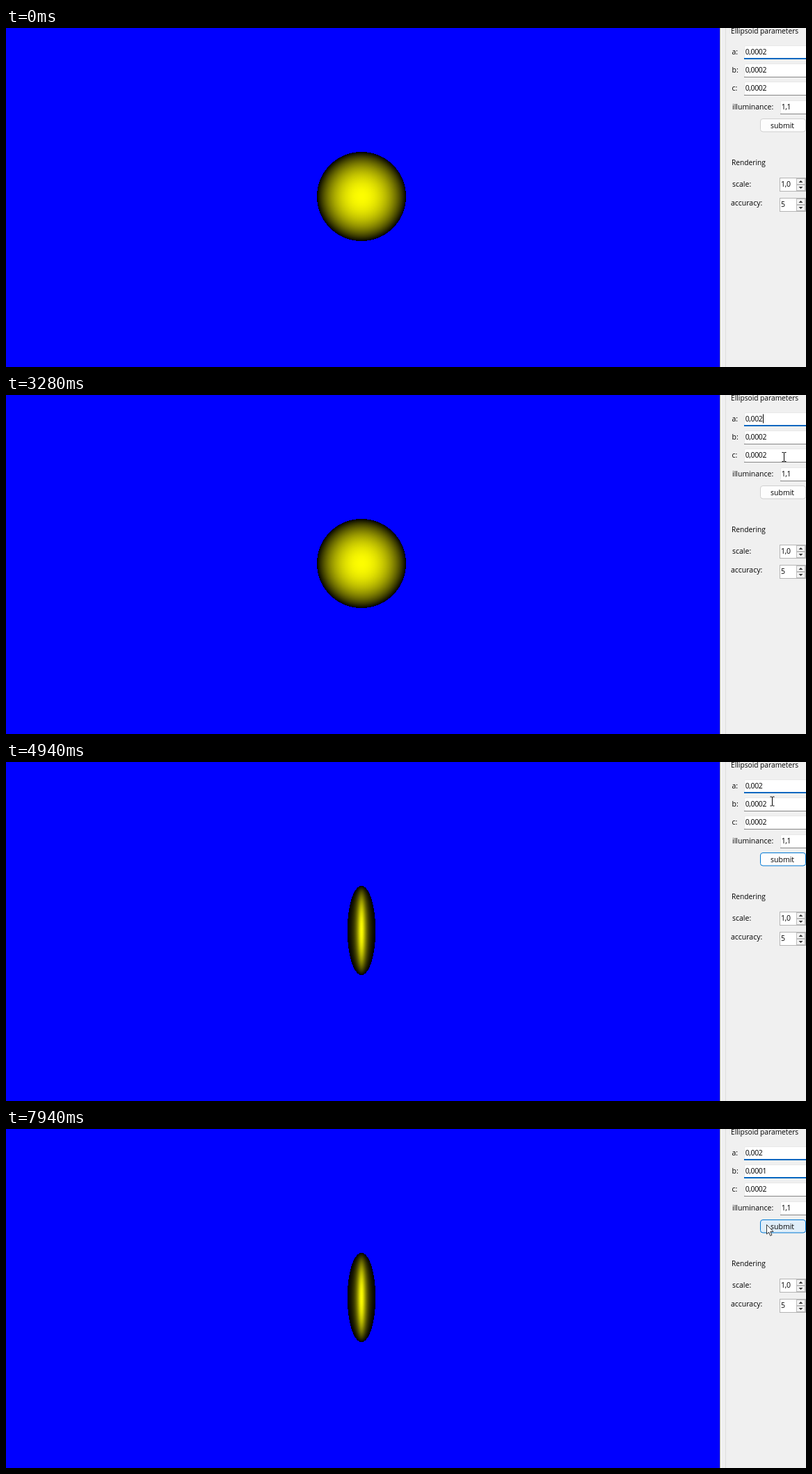
These frames come from a looping animation (1150x487 px, 8000 ms). An HTML page with a canvas:

```html
<!DOCTYPE html>
<html lang="en">
<head>
<meta charset="utf-8">
<title>Ellipsoid viewer</title>
<style>
  html, body { margin: 0; width: 100%; height: 100%; overflow: hidden; background: #f0f0f0; }
  svg, canvas { position: absolute; display: block; }
  svg { left: 0; top: 0; }
  #solid { left: 444px; top: 175px; }
  text { font: 10.5px "Open Sans", "Noto Sans", sans-serif; fill: #000; white-space: pre; }
  .head { font-size: 10.2px; }
  .num { letter-spacing: -.35px; }
  .box { fill: #fff; stroke: #e8e8e8; }
  .spin { fill: #f3f3f3; stroke: #bdbdbd; }
  .frame { fill: #fff; stroke: #b4b4b4; }
</style>
</head>
<body>
<svg width="1150" height="487" viewBox="0 0 1150 487">
  <rect width="1150" height="487" fill="#f0f0f0"/>
  <rect width="1026" height="487" fill="#00f"/>
  <rect x="1026" width="1" height="487" fill="#a0a0a0"/>
  <rect x="1027" width="1" height="487" fill="#fff"/>
  <rect x="1034" width="1" height="487" fill="#dedede"/>
  <g id="panel"></g>
  <rect id="face" x="1084.5" y="130.5" width="65" height="18.5" rx="3.5"/>
  <text x="1099" y="144">submit</text>
  <rect id="caret" width="1" height="13"/>
  <path id="beam" d="M-3 -6.5H-1L0 -6L1 -6.5H3M0 -6V6M-3 6.5H-1L0 6L1 6.5H3" fill="none" stroke="#000"/>
  <path id="arrow" d="M.5 .5V14L3.6 11.2L5.7 16.3L7.9 15.4L5.8 10.4H10Z" fill="#fff" stroke="#222" stroke-width=".9"/>
</svg>
<canvas id="solid" width="136" height="136"></canvas>
<script>
const $ = id => document.getElementById(id);
const LOOP = 8000, STEP = 70, TEXT_X = 1062.7;

function add(tag, attrs, text) {
  const el = document.createElementNS('http://www.w3.org/2000/svg', tag);
  for (const k in attrs) el.setAttribute(k, attrs[k]);
  if (text) el.textContent = text;
  return $('panel').appendChild(el);
}
const label = (x, y, text, cls = '') => add('text', { x, y, class: cls }, text);

function field(x, bottom, value) {
  add('rect', { x: x + .5, y: bottom - 19.5, width: 100, height: 19, rx: 2, class: 'box' });
  const line = add('rect', { x, y: bottom - 1, width: 100, height: 1, fill: '#868686' });
  const text = label(x + 1.7, bottom - 7, value, 'num');
  return { x, bottom, line, text, value };
}

function spinner(y, value) {
  add('rect', { x: 1112.5, y: y + .5, width: 37, height: 19, class: 'frame' });
  label(1114, y + 13, value, 'num');
  for (const s of [-1, 1]) {
    const cy = y + 10 + s * 4.5;
    add('rect', { x: 1136.5, y: cy - 4, width: 12, height: 8, class: 'spin' });
    add('path', { d: `M1139.5 ${cy - s * 1.5}h6l-3 ${s * 3}z`, fill: '#333' });
  }
}

label(1042, 8, 'Ellipsoid parameters', 'head');
label(1043, 197, 'Rendering', 'head');
const [a, b, c] = ['a:', 'b:', 'c:'].map((name, i) => {
  label(1043.5, 38 + 26 * i, name);
  return field(1061, 45 + 26 * i, '0,0002');
});
label(1044, 117, 'illuminance:');
const light = field(1113, 124, '1,1');
label(1044, 228, 'scale:');
spinner(215, '1,0');
label(1042, 255, 'accuracy:');
spinner(244, '5');

// Surface k·x² + y² + z² = 1, lit from the viewer
let drawn = 0;
function drawSolid(k) {
  if (k === drawn) return;
  drawn = k;
  const ctx = $('solid').getContext('2d'), img = ctx.createImageData(136, 136);
  for (let py = 0; py < 136; py++) {
    for (let px = 0; px < 136; px++) {
      const x = (px - 66.5) / 64, y = (py - 66.5) / 64;
      const zz = 1 - k * x * x - y * y;
      if (zz < 0) continue;
      const cos2 = zz / (k * k * x * x + y * y + zz);
      const shade = 253 * cos2 ** .9;
      img.data.set([shade, shade, 0, 255], (py * 136 + px) * 4);
    }
  }
  ctx.putImageData(img, 0, 0);
}

// Pointer moves: start, end, from, to
const moves = [
  [190, 940, [1128, 441], [1100.5, 29.5]],
  [1210, 1340, [1105.5, 24.5], [1100.5, 29.5]],
  [3280, 3840, [1118.5, 89], [1129, 141]],
  [4040, 4740, [1129, 141], [1101.5, 56.5]],
  [4940, 5430, [1101.5, 56.5], [1111.5, 69.5]],
  [7540, 7940, [1111, 78], [1093, 137]]
];
// Clicks give focus; an empty key is a backspace
const clicks = [[1340, a], [3840, 'submit'], [5185, b], [7940, 'submit']];
const keys = [[2480, a, ''], [2550, a, ''], [2950, a, '2'], [6420, b, ''], [7000, b, '1']];

const past = (list, t) => list.filter(e => e[0] <= t);
const last = (list, t) => past(list, t).pop();
const smooth = p => p * p * (3 - 2 * p);

function pointer(t) {
  const move = last(moves, t);
  if (!move) return null;
  const [start, end, from, to] = move;
  const p = t >= end ? 1 : Math.floor((t - start) / STEP) * STEP / (end - start);
  return from.map((v, i) => v + (to[i] - v) * smooth(p));
}

// Typing a character hides the pointer until it moves again
function pointerShown(t) {
  const move = last(moves, t), typed = last(keys.filter(k => k[2]), t);
  return move && !(typed && typed[0] > move[0]);
}

const inside = (p, x, y, bottom) => p && p[0] >= x && p[1] >= y && p[1] < bottom;
const over = (p, f) => inside(p, f.x, f.bottom - 20, f.bottom);
const overSpin = p => p && p[0] < 1136 && [215, 244].some(y => inside(p, 1112, y, y + 20));

function typedText(f, t) {
  return past(keys, t).filter(k => k[1] === f)
    .reduce((s, k) => k[2] ? s + k[2] : s.slice(0, -1), f.value);
}

function underline(f, active) {
  const h = active ? 2 : 1;
  f.line.setAttribute('y', f.bottom - h);
  f.line.setAttribute('height', h);
  f.line.setAttribute('fill', active ? '#0067c0' : '#868686');
}

function place(id, p) {
  $(id).style.display = p ? '' : 'none';
  if (p) $(id).setAttribute('transform', `translate(${p[0]} ${p[1]})`);
}

function render(t) {
  const p = pointer(t), focus = (last(clicks, t) || [])[1];
  for (const f of [a, b]) {
    f.text.textContent = typedText(f, t);
    const used = f === a || past(clicks, t).some(k => k[1] === f);
    underline(f, used && !over(p, f));
  }
  drawSolid(t < 4040 ? 1 : 10);

  const edit = focus && focus.text;
  place('caret', edit && [Math.round(TEXT_X + edit.getComputedTextLength()), focus.bottom - 17.5]);

  const shown = pointerShown(t);
  const text = [a, b, c, light].some(f => over(p, f)) || overSpin(p);
  place('beam', shown && text && p);
  place('arrow', shown && !text && p);

  const hover = inside(p, 1084, 130, 150);
  $('face').setAttribute('fill', hover ? '#e0eef9' : '#fdfdfd');
  $('face').setAttribute('stroke', hover || focus === 'submit' ? '#0078d4' : '#d0d0d0');
}

const begin = performance.now();
function tick() {
  render((performance.now() - begin) % LOOP);
  requestAnimationFrame(tick);
}
tick();
</script>
</body>
</html>
```
